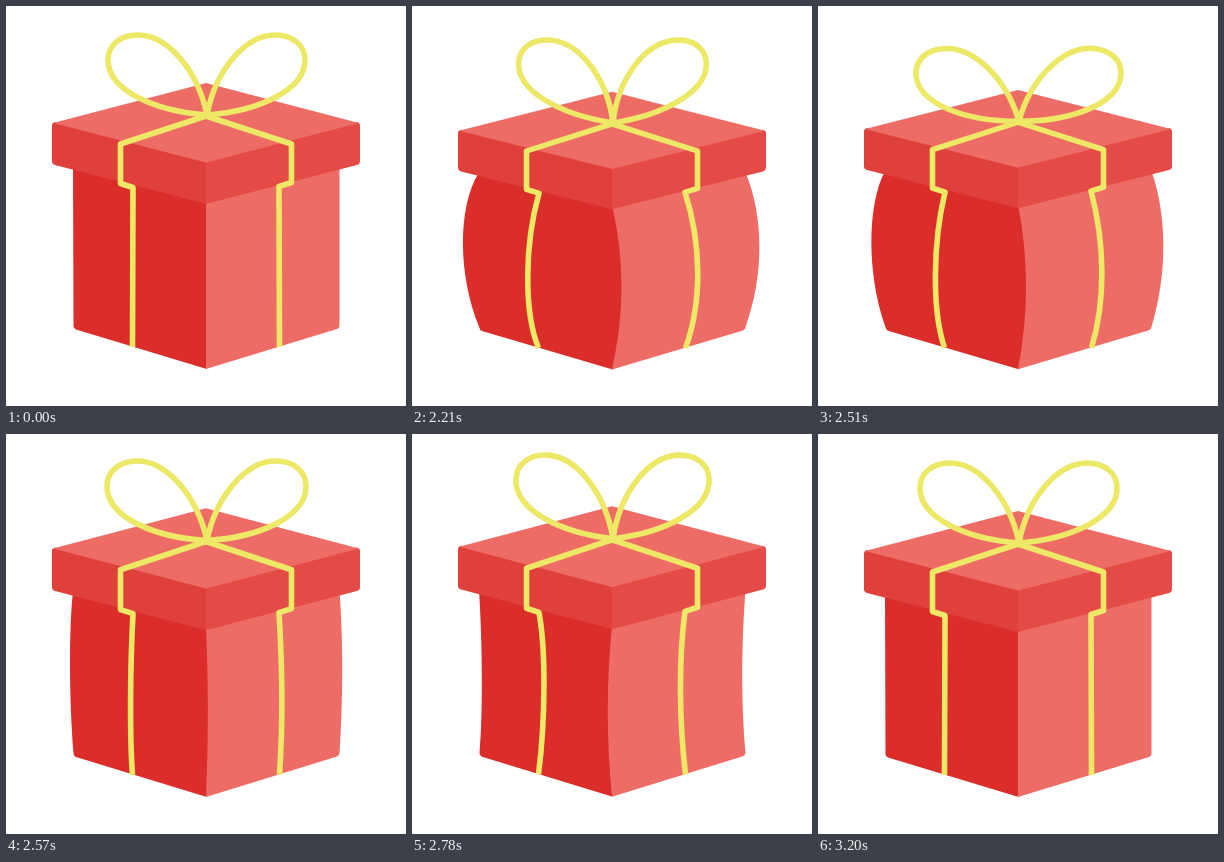
Write an HTML page that moves like this. It is 400 by 400 pixels and loops after 3.23 s.

```html
<!DOCTYPE html>
<html lang="en">
<head>
<meta charset="utf-8">
<title>Gift box</title>
<style>
  html, body { margin: 0; width: 100%; height: 100%; overflow: hidden; background: #fff; }
  svg { display: block; width: 100%; height: 100%; }
</style>
</head>
<body>
<svg viewBox="0 0 400 400">
  <g id="gift">
    <path id="left" fill="#db2d29"/>
    <path id="right" fill="#ee6c66"/>
    <path fill="#df403b" d="M46 119Q46 117 49 116L200.7 150V198L49 159Q46 158 46 155Z"/>
    <path fill="#e44b46" d="M354 119Q354 117 351 116L200 150V198L351 159Q354 158 354 155Z"/>
    <path fill="#ee6c66" d="M47 117L200 77L353 117L200 156.5Z"/>
    <g fill="none" stroke="#ede865" stroke-width="5.6" stroke-linejoin="round">
      <path id="ribbon"/>
      <path id="loopL" d="M201 109C192 65 162 29 132 29C113 29 102 40 102 54C102 84 148 105 201 109Z"/>
      <path id="loopR" d="M201 109C253 105 299 84 299 54C299 40 288 29 269 29C239 29 209 65 201 109Z"/>
    </g>
  </g>
</svg>
<script>
const LOOP = 3230, START = 2030, STEP = 30, FLOOR = 363, PIVOT = 376;
const el = id => document.getElementById(id);

// time, vertical scale, side bulge, inward tilt of the bow loops in degrees
const keys = [
  [2000, 1, 0, 0],
  [2030, .997, .23, .7],
  [2210, .9705, 1, 4.6],
  [2360, .9635, 1.12, 0],
  [2510, .9765, .85, -4.4],
  [2660, 1.057, -.8, 5],
  [2780, 1.016, -.4, 2],
  [2900, .98, 0, .6],
  [3080, 1.006, 0, .4],
  [3200, 1, 0, 0]
];

// For each upright line: reach when swelling, reach when pinched, how far the bend leans to one end
const bends = {
  left: [-16.3, -6.6, .11], ribbonL: [-11, -13, .1],
  front: [9.5, 10.5, 0], ribbonR: [12.5, 12, .04], right: [14, 8, .04]
};

function pose(t) {
  const i = keys.findIndex(k => k[0] > t) - 1;
  if (i < 0) return [1, 0, 0];
  const a = keys[i], b = keys[i + 1], span = b[0] - a[0], u = (t - a[0]) / span;
  const slope = (n, c) => {
    const p = keys[n - 1], q = keys[n + 1];
    return p && q ? (q[c] - p[c]) / (q[0] - p[0]) * span : 0;
  };
  return [1, 2, 3].map(c => {
    const m = slope(i, c), n = slope(i + 1, c), d = b[c] - a[c];
    return a[c] + u * (m + u * (3 * d - 2 * m - n + u * (m + n - 2 * d)));
  });
}

function draw(now) {
  const t = now % LOOP;
  const time = t < START ? 0 : START + Math.floor((t - START) / STEP) * STEP;
  const [scale, bulge, tilt] = pose(time);

  const bend = (name, x0, y0, x1, y1) => {
    const [swell, pinch, lean] = bends[name], h = y1 - y0;
    const d = bulge * (bulge > 0 ? swell : pinch) * 4 / 3;
    const top = 1 / 3 - (bulge < 0 ? lean : 0), bottom = 1 / 3 - (bulge > 0 ? lean : 0);
    return `C${x0 + d} ${y0 + h * top} ${x1 + d} ${y1 - h * bottom} ${x1} ${y1}`;
  };
  const front = x => `M${x} 194` + bend('front', x, 194, x, FLOOR);

  // The left face runs slightly under the right one to hide the seam
  el('left').setAttribute('d',
    `${front(200.7)}L70 323.5Q67.5 322.5 67.5 320${bend('left', 67.5, 320, 67, 160)}Z`);
  el('right').setAttribute('d',
    `${front(200)}L331 323Q333.5 322 333.5 319.5${bend('right', 333.5, 319.5, 333.5, 160)}Z`);
  el('ribbon').setAttribute('d',
    `M200 110L114.5 138V177.5L127 181.5${bend('ribbonL', 127, 181.5, 126.5, 341)}` +
    `M200 110L285.5 138V176.5L273 180.5${bend('ribbonR', 273, 180.5, 273.5, 341)}`);
  el('loopL').setAttribute('transform', `rotate(${tilt} 201 109)`);
  el('loopR').setAttribute('transform', `rotate(${-tilt} 201 109)`);
  el('gift').setAttribute('transform', `matrix(1 0 0 ${scale} 0 ${PIVOT * (1 - scale)})`);
}

const begin = performance.now();
function tick() {
  draw(performance.now() - begin);
  requestAnimationFrame(tick);
}
tick();
</script>
</body>
</html>
```
